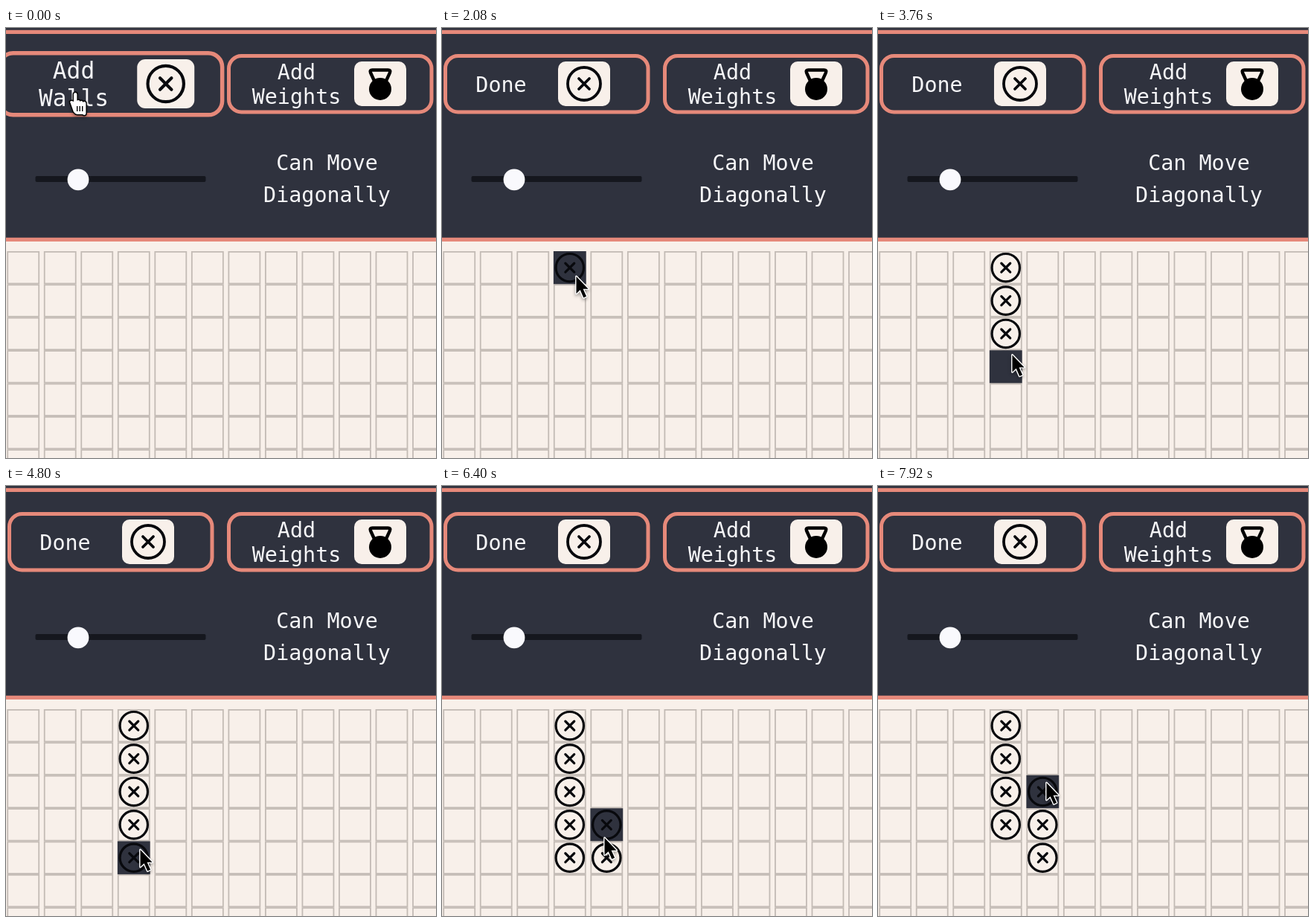
Write an HTML page with a canvas that moves like this. It is 578 by 578 pixels and loops after 8000 ms.

```html
<!DOCTYPE html>
<html lang="en">
<head>
<meta charset="utf-8">
<title>Wall editor</title>
<style>
  html, body { margin: 0; width: 100%; height: 100%; overflow: hidden; background: #f8f0ea; }
  canvas { display: block; }
</style>
</head>
<body>
<canvas width="578" height="578"></canvas>
<script>
const ctx = document.querySelector('canvas').getContext('2d');
const SIZE = 578, LOOP = 8000;
const DARK = '#2f323e', CORAL = '#e6897a', CREAM = '#f8f0ea', INK = '#08090d', LINE = '#c3bbb5';
const COL = 49.53, ROW = 44.38, CELL = 43.8, GRID_X = 1.3, GRID_Y = 300;
const DONE_AT = 640, LEAVE_AT = 1040, FIRST_CLICK = 1720, CLICK_EVERY = 760;

// The pointer leaves the button, clicks down one column, then zigzags beside it
const START = [93, 87], EXIT = [89, 128];
const targets = Array.from({ length: 5 }, (_, i) => [179, 320 + 41.5 * i]);
targets.push([214, 487], [217, 470], [173, 487], [225, 396]);
const clickTime = i => FIRST_CLICK + CLICK_EVERY * i;

const arrow = new Path2D('M1.5 3V26l5.2-4.8L11.3 31.5l3.8-1.7-4.5-10H17.6Z');
const handle = new Path2D('M495 71L490 60Q488.5 56.5 492.5 56.5H513.5Q517.5 56.5 516 60L511 71');
const hand = new Path2D('M1 14Q4 11 8 16V28H6Z');
hand.roundRect(6, 15, 16, 16, [0, 0, 5, 5]);
for (let i = 0; i < 4; i++) hand.roundRect(6 + 4 * i, i ? 11 + i : 2, 4.4, 18, 2.2);

function ease(t, from, to) {
  const p = Math.max(0, Math.min(1, (t - from) / (to - from)));
  return p * p * (3 - 2 * p);
}

function cursorAt(t) {
  let [x, y] = START;
  const moveTo = ([toX, toY], from, to) => {
    const p = ease(t, from, to);
    x += (toX - x) * p;
    y += (toY - y) * p;
  };
  moveTo(EXIT, LEAVE_AT - 120, LEAVE_AT);
  targets.forEach((target, i) =>
    moveTo(target, i ? clickTime(i) - 540 : LEAVE_AT, clickTime(i) - 120 * (i > 0)));
  return [x, y];
}

const cellAt = (x, y) => Math.floor((x - GRID_X) / COL) + ',' + Math.floor((y - GRID_Y) / ROW);

function wallsAt(t) {
  const walls = new Set();
  targets.forEach(([x, y], i) => {
    const cell = cellAt(x, y);
    if (t >= clickTime(i) && !walls.delete(cell)) walls.add(cell);
  });
  return walls;
}

function fillRect(color, x, y, w, h, r = 0) {
  ctx.fillStyle = color;
  ctx.beginPath();
  ctx.roundRect(x, y, w, h, r);
  ctx.fill();
}

function disc(color, x, y, r) {
  ctx.fillStyle = color;
  ctx.beginPath();
  ctx.arc(x, y, r, 0, 7);
  ctx.fill();
}

function label(text, x, y, lineHeight = 33) {
  ctx.font = '28.4px "DejaVu Sans Mono", monospace';
  ctx.textAlign = 'center';
  ctx.fillStyle = '#f6f6f8';
  text.split('\n').forEach((line, i) => ctx.fillText(line, x, y + i * lineHeight));
}

function wallIcon(x, y, scale) {
  ctx.save();
  ctx.translate(x, y);
  ctx.scale(scale, scale);
  ctx.strokeStyle = INK;
  ctx.lineWidth = 3.8;
  ctx.lineCap = 'round';
  ctx.beginPath();
  ctx.arc(0, 0, 22, 0, 7);
  ctx.moveTo(-7, -7); ctx.lineTo(7, 7);
  ctx.moveTo(7, -7); ctx.lineTo(-7, 7);
  ctx.stroke();
  ctx.restore();
}

function button(x, iconX) {
  ctx.strokeStyle = CORAL;
  ctx.lineWidth = 5;
  ctx.beginPath();
  ctx.roundRect(x + 2.5, 37.5, 272.5, 75.5, 17);
  ctx.stroke();
  fillRect(CREAM, iconX, 45, 70, 60, 10);
}

function wallButton(t) {
  const scale = 1.1 - 0.1 * ease(t, LEAVE_AT, LEAVE_AT + 300);
  const done = t >= DONE_AT, iconX = done ? 156 : 173;
  ctx.save();
  ctx.translate(140.5, 75);
  ctx.scale(scale, scale);
  ctx.translate(-140.5, -75);
  button(2, iconX);
  wallIcon(iconX + 35, 75, 1);
  if (done) label('Done', 79.5, 86);
  else label('Add\nWalls', 95.5, 69);
  ctx.restore();
}

function weightButton() {
  button(297, 468);
  label('Add\nWeights', 390.5, 69);
  ctx.strokeStyle = '#000';
  ctx.lineWidth = 4.4;
  ctx.stroke(handle);
  disc('#000', 503, 82, 15);
}

function slider() {
  fillRect('#15171e', 39.5, 199, 229, 8, 2);
  disc('#f9f9fd', 97, 203.8, 14.4);
}

function grid(t, x, y) {
  const walls = wallsAt(t), hovered = cellAt(x, y);
  for (let r = 0; r < 7; r++) for (let c = 0; c < 12; c++) {
    const left = GRID_X + c * COL, top = GRID_Y + r * ROW, cell = c + ',' + r;
    ctx.strokeStyle = LINE;
    ctx.lineWidth = 1.8;
    ctx.strokeRect(left + 0.9, top + 0.9, CELL - 1.8, ROW - 1.8);
    if (cell === hovered) fillRect(DARK, left, top, CELL, ROW);
    if (walls.has(cell)) wallIcon(left + CELL / 2, top + ROW / 2, 0.85);
  }
}

function cursor(t, x, y) {
  const pointing = t < LEAVE_AT - 40;
  const shape = pointing ? hand : arrow;
  ctx.save();
  ctx.translate(x - (pointing ? 8 : 0), y - (pointing ? 2 : 0));
  ctx.lineJoin = 'round';
  ctx.lineWidth = 2.8;
  ctx.strokeStyle = pointing ? '#000' : '#fff';
  ctx.fillStyle = pointing ? '#fff' : '#000';
  ctx.shadowColor = 'rgba(0,0,0,.4)';
  ctx.shadowBlur = 4;
  ctx.shadowOffsetY = 2;
  ctx.stroke(shape);
  ctx.shadowColor = 'transparent';
  ctx.fill(shape);
  if (pointing) for (let i = 0; i < 3; i++) fillRect('#000', 10 + 3.5 * i, 20, 1.4, 7);
  ctx.restore();
}

function draw(t) {
  const [x, y] = cursorAt(t);
  fillRect(CREAM, 0, 0, SIZE, SIZE);
  fillRect(DARK, 0, 0, SIZE, 284);
  for (const top of [2.8, 281.8]) fillRect(CORAL, 0, top, SIZE, 5.2);
  wallButton(t);
  weightButton();
  slider();
  label('Can Move\nDiagonally', 431.5, 191, 43);
  grid(t, x, y);
  cursor(t, x, y);
}

const start = performance.now();
function tick() {
  draw((performance.now() - start) % LOOP);
  requestAnimationFrame(tick);
}
tick();
</script>
</body>
</html>
```
